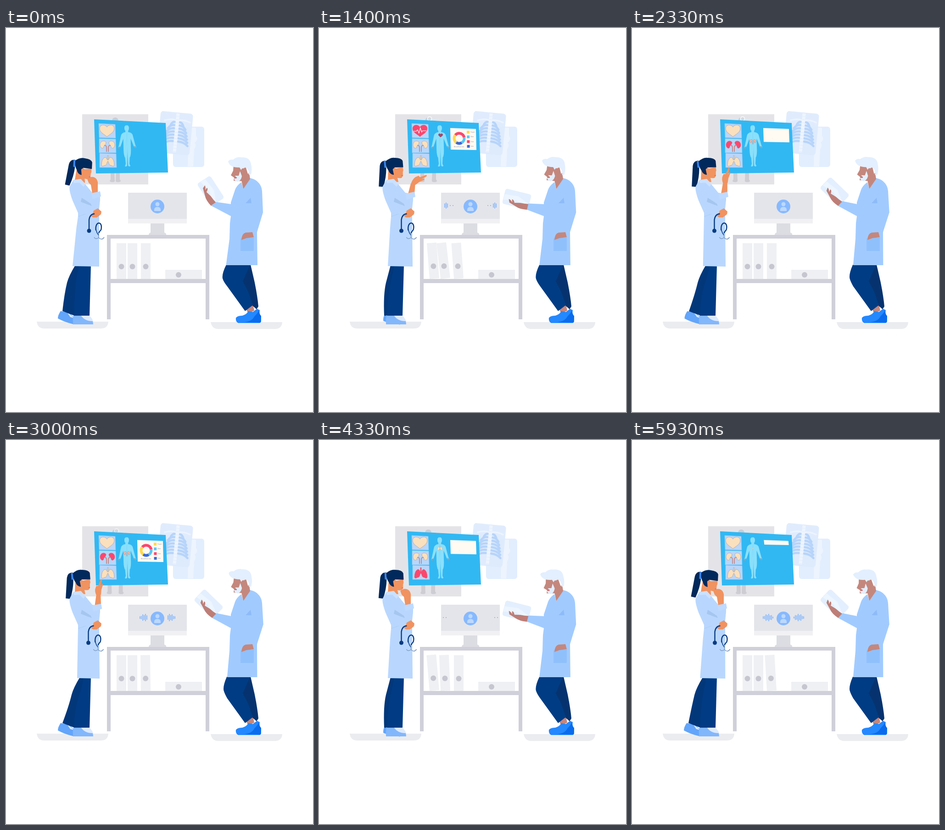
Recreate the animation shown at these times as an HTML page. Size 669 by 837 pixels, loop 5.99 s.

```html
<!DOCTYPE html>
<html lang="en">
<head>
<meta charset="utf-8">
<title>Doctors at the board</title>
<style>
html, body { margin: 0; width: 100%; height: 100%; overflow: hidden; background: #fff }
svg { display: block; width: 100vw; height: 100vh }
text { font: 3.4px Arial, "Liberation Sans", sans-serif; fill: #8f96a5 }
</style>
</head>
<body>
<svg viewBox="0 0 669 837">
  <defs>
    <path id="heart" d="M0 13C-5 8-16 4-16-5C-16-14-4-15 0-8C4-15 16-14 16-5C16 4 5 8 0 13Z"/>
    <g id="kidneys">
      <path d="M-3-6C-7-12-17-8-16 1C-15 8-8 9-8 4C-7 0-3 0-3-6ZM3-6C7-12 17-8 16 1C15 8 8 9 8 4C7 0 3 0 3-6Z"/>
      <path d="M-7 1Q-2 0-2 6V15M7 1Q2 0 2 6V15" fill="none" stroke="#c58b8c" stroke-width="1.8"/>
    </g>
    <path id="lungs" d="M-1-12V-2Q-3-9-7-8Q-14-4-14 9Q-13 13-8 10Q-2 9-2 4L0 0L2 4Q2 9 8 10Q13 13 14 9Q14-4 7-8Q3-9 1-2V-12Z"/>
    <path id="half" d="M0-46Q-5-46-5-40Q-5-36-3-34V-31Q-12-30-13-23L-18-2Q-20 1-19 4Q-16 4-14-1L-8-17L-8 8Q-8 20-5 25L-4 38L-6 43Q-3 45-1 42L0 10Z"/>
    <path id="shin" d="M-4-18H4L5 7Q6 11 0 11Q-6 11-6 8L-4 5Z"/>
  </defs>

  <!-- wall -->
  <path fill="#e4e4e8" d="M166 188H310V341H166Z"/>
  <g fill="#cdcdd3">
    <circle cx="238" cy="202" r="7"/>
    <use href="#shin" id="shinL"/><use href="#shin" id="shinR"/>
  </g>
  <circle id="ring" cx="241" cy="198" r="4.5" fill="#d7d8de" stroke="#fff" stroke-width="1.5"/>
  <rect x="364" y="215" width="68" height="88" rx="6" fill="#e2eefe"/>
  <path fill="#edf4fe" d="M402 217H414V235Q420 243 411 250Q416 256 410 264L408 302H396L397 266Q392 258 400 250Q396 243 402 236Z"/>
  <g transform="translate(371 229) rotate(5.5)">
    <rect x="-38" y="-45" width="71" height="91" rx="6" fill="#deebfd" opacity=".93"/>
    <path fill="none" stroke="#eef5fe" stroke-width="7" stroke-dasharray="6 1" d="M0-43V42"/>
    <path fill="none" stroke="#edf4fe" stroke-width="3" d="M-29-25Q-15-31-3-28M3-28Q15-31 29-25"/>
    <path id="ribs" fill="none" stroke="#b7d4fa" stroke-width="4.8" stroke-linecap="round"/>
  </g>

  <!-- blue panel -->
  <path fill="#31b8f3" d="M192 199L348 207L353 315L196 317Z"/>
  <g fill="#b8d6fa" stroke="#94c6f0" stroke-width=".6">
    <path d="M202 208L238 210L239 240L203 239Z"/>
    <path d="M203 241L239 242L240 272L203 272Z"/>
    <path d="M204 273L240 274L241 304L204 304Z"/>
  </g>
  <g fill="#fbe0bd" stroke="#aaa5a4" stroke-width=".8">
    <use href="#heart" x="220" y="224"/>
    <use href="#kidneys" x="221" y="255"/>
    <use href="#lungs" x="222" y="290"/>
  </g>
  <g fill="#fb476f">
    <g id="on0"><use href="#heart" x="220" y="224"/><path id="pulse" fill="none" stroke="#fff" stroke-width="1.1"/></g>
    <use id="on1" href="#kidneys" x="221" y="255"/>
    <use id="on2" href="#lungs" x="222" y="290"/>
  </g>
  <g transform="translate(264 258) rotate(-1.5)" fill="#8ae0fb">
    <use href="#half"/><use href="#half" transform="scale(-1 1)"/>
    <path fill="#7da6bd" d="M-18 0L-15 0L-17 5L-20 4ZM18 0L15 0L17 5L20 4Z"/>
  </g>
  <use id="spot0" href="#heart" fill="#d8344c" stroke="#3d548f" stroke-width="3"/>
  <use id="spot1" href="#kidneys" fill="#f6b8a4" stroke="#b25561"/>
  <use id="spot2" href="#lungs" fill="#fbdfc1" stroke="#c98b78"/>
  <path id="card" fill="#fffaf2"/>
  <g id="donut" fill="none" stroke-width="6"></g>
  <g id="legend"></g>
  <text id="caption" x="294" y="260">Blood flow rate</text>

  <!-- desk -->
  <path fill="#dcdde2" d="M315 426H345V446Q350 447 349 451H311Q311 447 315 446Z"/>
  <path fill="#e4e5ea" d="M266 359H394V417H266Z"/>
  <path fill="#f1f1f4" d="M266 416H394V426H266Z"/>
  <circle cx="330" cy="389" r="15" fill="#87b9fe"/>
  <circle cx="330" cy="384" r="4.5" fill="#bdd8fe"/>
  <path fill="#bdd8fe" d="M323 399V395Q324 390 330 390Q336 390 337 395V399Z"/>
  <path id="wave" fill="none" stroke="#8fbcfa" stroke-width="2"/>
  <g id="binders"></g>
  <path fill="#eff0f3" d="M347 527H427V547H347Z"/>
  <circle cx="376" cy="538" r="6" fill="#c6c6d0"/>
  <path fill="#d0d0da" d="M220 451H443V635H435V556H228V635H220ZM228 459V547H435V459Z"/>
  <path fill="#ebecef" d="M67 640H223Q222 655 207 655H83Q69 655 67 640ZM446 641H602Q601 656 586 656H462Q449 656 446 641Z"/>

  <!-- woman -->
  <g id="backFoot"><path fill="#62a5fa" d="M119 617Q113 626 113 633Q127 641 148 646L152 633Q144 629 140 621Z"/><path fill="#dbeafe" d="M134 621Q143 625 147 632L140 630Z"/></g>
  <path id="backLeg" fill="#02377a"/>
  <path fill="#82b7fc" d="M147 626H179Q190 633 190 646H146Q145 636 147 626Z"/>
  <path fill="#dceafe" d="M163 626H180Q187 631 189 639Q171 639 163 626Z"/>
  <path id="frontLeg" fill="#003b83"/>
  <g id="head">
    <path fill="#02295b" d="M146 289Q135 288 133 300L130 345L140 346Q147 325 147 304Z"/>
    <path fill="#f09361" d="M151 311L183 303L184 311L183 314L183 323L180 327Q176 328 171 327L173 336L150 334Z"/>
    <path fill="#02295b" d="M145 291Q156 281 166 283Q180 283 183 290L184 304L165 304L163 320Q155 319 152 311Q146 302 145 291Z"/>
    <path fill="#f09361" d="M161 308Q166 302 169 308Q168 318 163 318Z"/>
    <path fill="#3a86ec" d="M142 289L146 290L147 305L143 304Z"/>
    <path fill="#e5505c" d="M179 322L183 321L182 323Z"/>
  </g>
  <path id="coat" fill="#b9d7fe"/>
  <path fill="#a6c6ef" d="M165 370L185 383L187 388L163 379Z"/>
  <path fill="#cbe1fe" d="M146 332L163 329L173 340L169 346L160 337L148 338Z"/>
  <path fill="none" stroke="#a9c9f3" stroke-width=".8" d="M157 411L174 405"/>
  <g id="arm">
    <path id="thinkHand" fill="#f09361" d="M188 361L185 342L180 337L177 329Q184 323 191 325Q198 327 200 336L200 361Z"/>
    <g id="pointArm" fill="#f09361">
      <path d="M191 361L197 338L207 336L205 361Z"/>
      <path id="openHand" d="M197 340Q200 329 207 324L214 321L217 324L231 319L232 322L220 329L227 327L226 330L215 335L207 341Z"/>
    </g>
    <path fill="#bedafe" d="M186 360L205 356L207 367L188 373Z"/>
  </g>
  <path fill="#f09361" d="M185 410Q190 403 191 398L200 393L208 400L207 406L198 413L190 413Z"/>
  <g id="scope" fill="none" stroke="#083b82" stroke-width="2.4">
    <path d="M193 405Q183 405 181 418L181 440M196 441C193 420 212 420 207 440Q204 443 202 447"/>
    <path stroke-width="1.5" d="M196 440Q198 447 202 452"/>
    <path stroke="#7e9bc4" stroke-width="1.5" d="M202 447V457M192 456Q195 462 202 457Q209 464 214 456"/>
    <circle cx="181" cy="442" r="4.5" fill="#083b82" stroke="none"/>
  </g>

  <!-- man -->
  <path fill="#c4877d" d="M523 612L538 602L541 616L528 623Z"/>
  <path fill="#06336f" d="M500 516H533L542 555Q548 585 550 607L546 613L520 590Z"/>
  <path id="manLeg" fill="#003c83"/>
  <path fill="#2488ff" d="M501 632Q504 627 515 627Q525 624 528 617L538 619L547 612L553 615Q551 623 556 628V640L553 643H506Q500 640 501 632Z"/>
  <path fill="#0a6cec" d="M512 641Q535 642 541 629Q548 622 552 615Q551 623 556 628L555 642Z"/>
  <path id="manCoat" fill="#a1cbff"/>
  <path fill="#c4877d" d="M512 327L530 316L532 329L517 351Z"/>
  <path fill="#8ebbf8" d="M522 382L533 370L535 382Z"/>
  <path fill="#90c0fc" d="M511 459L519 457H540V486H511Z"/>
  <path fill="#c4877d" d="M513 462Q514 448 522 446L537 445L540 456L524 458Z"/>
  <g id="manHead">
    <path fill="#c4877d" d="M496 298L521 298L527 318L516 334L496 333L497 326L490 321L495 311Z"/>
    <path fill="#e3effe" d="M510 312L514 323Q512 333 505 335Q498 334 497 328L503 327L499 322L507 322Z"/>
    <path fill="#e3effe" d="M484 291Q487 286 495 287Q503 280 513 282Q532 281 534 297Q537 308 534 319L529 320V313Q525 302 519 305L513 311L509 304Q488 305 484 291Z"/>
    <path fill="#c4877d" d="M512 310Q516 302 520 309Q520 318 514 319Z"/>
    <path fill="#d95e65" d="M497 327L503 325L502 328Z"/>
  </g>
  <g id="tablet">
    <rect x="-29" y="-17" width="58" height="34" rx="5" fill="#e3effe"/>
    <path fill="#edf5ff" d="M-28-4L2-7L28 4V13L0 3L-28 8Z"/>
    <path fill="#bd7e77" d="M-17 4Q-13 4-8 9L-10 3Q-6 2-3 9L10 6Q18 6 28 4L28 17Q11 20 2 16L-14 11Z"/>
  </g>
  <path id="sleeve" fill="#a1cbff"/>
</svg>
<script>
const LOOP = 5990, STEP = LOOP / 90, TURN = LOOP / 3;
const $ = id => document.getElementById(id);
const set = (id, name, value) => $(id).setAttribute(name, value);
const range = n => [...Array(n).keys()];

const unit = (t, a, b) => Math.min(1, Math.max(0, (t - a) / (b - a)));
const ease = (t, a, b) => { const u = unit(t, a, b); return u * u * (3 - 2 * u); };
// Rises over a..b, falls over c..d
const bump = (t, a, b, c, d) => ease(t, a, b) - ease(t, c, d);
// Rises past 1 and settles
const pop = (t, a, span) => ease(t, a, a + span) * (1 + .7 * Math.sin(Math.PI * unit(t, a, a + span)));

set("ribs", "d", range(7).map(i => {
  const y = 7 * i - 24, w = 8 + 13 * Math.sqrt(i / 6);
  return `M6 ${y}q${w * .6} 0 ${w} 8M-6 ${y}q${-w * .6} 0 ${-w} 8`;
}).join(""));

const SHARES = [["#fb476f", .36], ["#5cc6f6", .2], ["#3c69d6", .18], ["#ffd950", .26]];
const ring = 22 * Math.PI;
let from = -.14;
for (const [color, share] of SHARES) {
  $("donut").innerHTML += `<circle r="11" stroke="${color}" stroke-dasharray="${share * ring} ${ring}" transform="rotate(${from * 360 - 90})"/>`;
  from += share;
}
const LEGEND = [["#ffd950", "Oxygen"], ["#5cc6f6", "Water"], ["#fb476f", "Pulse"], ["#3c69d6", "Salts"]];
$("legend").innerHTML = LEGEND.map(([color, label], i) =>
  `<g id="item${i}"><rect x="-3" y="-3" width="6" height="6" fill="${color}"/><text x="5" y="1" style="font-size:2.8px">${label}</text></g>`).join("");

const BINDERS = [241, 265, 294];
$("binders").innerHTML = BINDERS.map((x, i) =>
  `<g id="binder${i}"><rect x="${x}" y="469" width="21" height="78" fill="#eff0f3"/><circle cx="${x + 10.5}" cy="520" r="6" fill="#c6c6d0"/></g>`).join("");

// Times when the caller speaks and the binders topple
const CALLS = [0, 2600, 5400];

// A large swell, a small swell, then dots
function barHeight(n) {
  if (n < 0 || n > 15) return 0;
  if (n < 8) return 16 * Math.sin(Math.PI * (n + 1) / 9) * (n % 2 ? .7 : 1);
  if (n < 12) return 13 * Math.sin(Math.PI * (n - 8) / 4);
  return n % 2 * 2;
}

function drawDesk(t) {
  let d = "";
  for (const start of CALLS) for (const k of range(13)) {
    const h = barHeight(Math.round((t - start) / STEP) - k - 1);
    if (h > 0) for (const x of [307 - 3 * k, 353 + 3 * k]) d += `M${x} ${387 - h / 2}v${h}`;
  }
  set("wave", "d", d);

  // The right binder topples first and recovers first
  BINDERS.forEach((x, i) => {
    const fall = CALLS.reduce((sum, start) => {
      const a = start + 1000 - 350 * i, b = start + 1700 - 275 * i;
      return sum + bump(t, a, a + 500, b, b + 500);
    }, 0);
    set("binder" + i, "transform", `rotate(${-(5 + 1.5 * i) * fall} ${x} 547)`);
  });
}

function drawPanel(t) {
  const turn = Math.floor(t / TURN), c = t % TURN;
  const lit = bump(c, 130, 300, 1600, 1880), spot = bump(c, 130, 330, 1780, 2000);
  const places = [[265, 234, .28], [263.5, 247, .42], [263.5, 236, .4]];
  places.forEach(([x, y, size], i) => {
    set("on" + i, "opacity", i == turn ? lit : 0);
    set("spot" + i, "transform", `translate(${x} ${y}) scale(${i == turn ? size * spot : 0})`);
  });
  set("pulse", "d", `M206 225H${223 - c / 125}l3 -3l3 7l3 -11l3 9l2 -3H234`);

  const h = 47 * bump(c, 130, 470, 1740, 2010) + 3 * bump(c, 450, 580, 620, 800);
  const inset = Math.max(0, 2 - h / 15);
  set("card", "d", h < .5 ? "" : `M${286 + inset} 218L${342 - inset} 220L${343 - inset} ${219 + h}L${287 + inset} ${218 + h}Z`);
  const out = 1 - ease(c, 1680, 1800);
  set("donut", "transform", `translate(305.5 240.5) scale(${out * pop(c, 300, 400)}) rotate(${210 * ease(c, 300, 850) - 210})`);
  LEGEND.forEach((_, i) =>
    set("item" + i, "transform", `translate(${325 + i * .2} ${227 + i * 10.3}) scale(${out * pop(c, 340 + 60 * i, 350)})`));
  set("caption", "opacity", out * ease(c, 700, 900));
}

function drawWoman(t, look, reach) {
  const stride = bump(t, 500, 1200, 1900, 2400) + bump(t, 3250, 3800, 4550, 5100);
  const lean = bump(t, 0, 700, 5400, 6250);
  const hem = 145 + 10 * lean - 5 * stride * lean;
  const knee = 133 + 10 * lean + 3 * stride;
  const ankle = 123 + 19 * stride, low = 617 + 10 * stride;
  set("backFoot", "transform", `translate(${28 * stride} ${3 * stride}) rotate(${-8 * stride} 130 640)`);
  set("backLeg", "d", `M${hem + 6} 517Q${knee + 4} 540 ${knee} 555Q${knee - 6} 580 ${ankle} ${low}L${ankle + 26} 627L172 570L180 517Z`);
  set("frontLeg", "d", `M${hem + 14} 517H185L182 627H148Q149 580 ${hem + 8} 545Z`);
  set("coat", "d", `M147 331L163 329L174 342L188 359L205 362L205 375L203 394L203 414L${203 + lean} 520L${hem} 519L${hem * .3 + 110} 435L157 411L157 403L145 376Q135 349 140 343Z`);
  set("scope", "transform", `translate(${-1.5 * lean} 0)`);

  set("head", "transform", `rotate(${7 - 6 * look - 2 * reach} 160 331)`);
  const pointing = reach > .4, wrist = -42 * (1 - stride);
  set("arm", "transform", `translate(${3 * reach} ${reach})`);
  set("thinkHand", "visibility", pointing ? "hidden" : "visible");
  set("thinkHand", "transform", `rotate(${14 * reach} 195 362)`);
  set("pointArm", "visibility", pointing ? "visible" : "hidden");
  set("pointArm", "transform", `rotate(${wrist / 8 - 6 * (1 - reach)} 198 362)`);
  set("openHand", "transform", `rotate(${wrist} 202 338)`);
}

function drawMan(t, reach) {
  const rise = ease(t, 0, 500);
  const dip = bump(t, 800, 1400, 1700, 2300) + bump(t, 3300, 4100, 4300, 4900);
  const sway = 2.4 * rise * (1 - .7 * dip);
  const angle = 57 - 13 * rise - 30 * dip, swing = (57 - angle) / 43;
  const x = 446 - 15 * swing, y = 355 + 18 * swing ** 2;
  set("tablet", "transform", `translate(${x} ${y}) rotate(${angle})`);
  const r = angle * Math.PI / 180, cos = Math.cos(r), sin = Math.sin(r);
  const at = (u, v) => `${x + u * cos - v * sin} ${y + u * sin + v * cos}`;
  set("sleeve", "d", `M${at(27, 3)}L491 384L505 390L490 410L${at(27, 17)}Z`);
  set("manHead", "transform", `rotate(${(6 * reach - 3) * rise} 522 330)`);
  set("manCoat", "d", `M513 336Q502 344 499 353L490 380L490 410L488 425L487 460L${479.5 + sway} 517H${548 - sway / 4}L547 445L${560 + sway / 3} 402L558 355C557 340 545 329 531 327L517 351Z`);
  set("manLeg", "d", `M${480 + sway / 2} 516Q${470 + sway} 536 ${472 + sway} 546Q${474 + sway} 553 482 563L521 617L538 604L528 575L516 552L532 516Z`);
}

function drawChart(look, reach) {
  const gap = 6 + 5 * look + 2 * reach;
  set("shinL", "transform", `translate(${238 - gap} 325)`);
  set("shinR", "transform", `translate(${238 + gap} 325) scale(-1 1)`);
  set("ring", "opacity", reach);
}

function draw(now) {
  const t = Math.floor((now % LOOP) / STEP) * STEP;
  const look = bump(t, 800, 1250, 5250, 5700);
  const reach = bump(t, 850, 1250, 2850, 3300) + bump(t, 4300, 4700, 5350, 5750);
  drawDesk(t);
  drawPanel(t);
  drawChart(look, reach);
  drawWoman(t, look, reach);
  drawMan(t, reach);
  requestAnimationFrame(draw);
}
draw(0);
</script>
</body>
</html>
```
